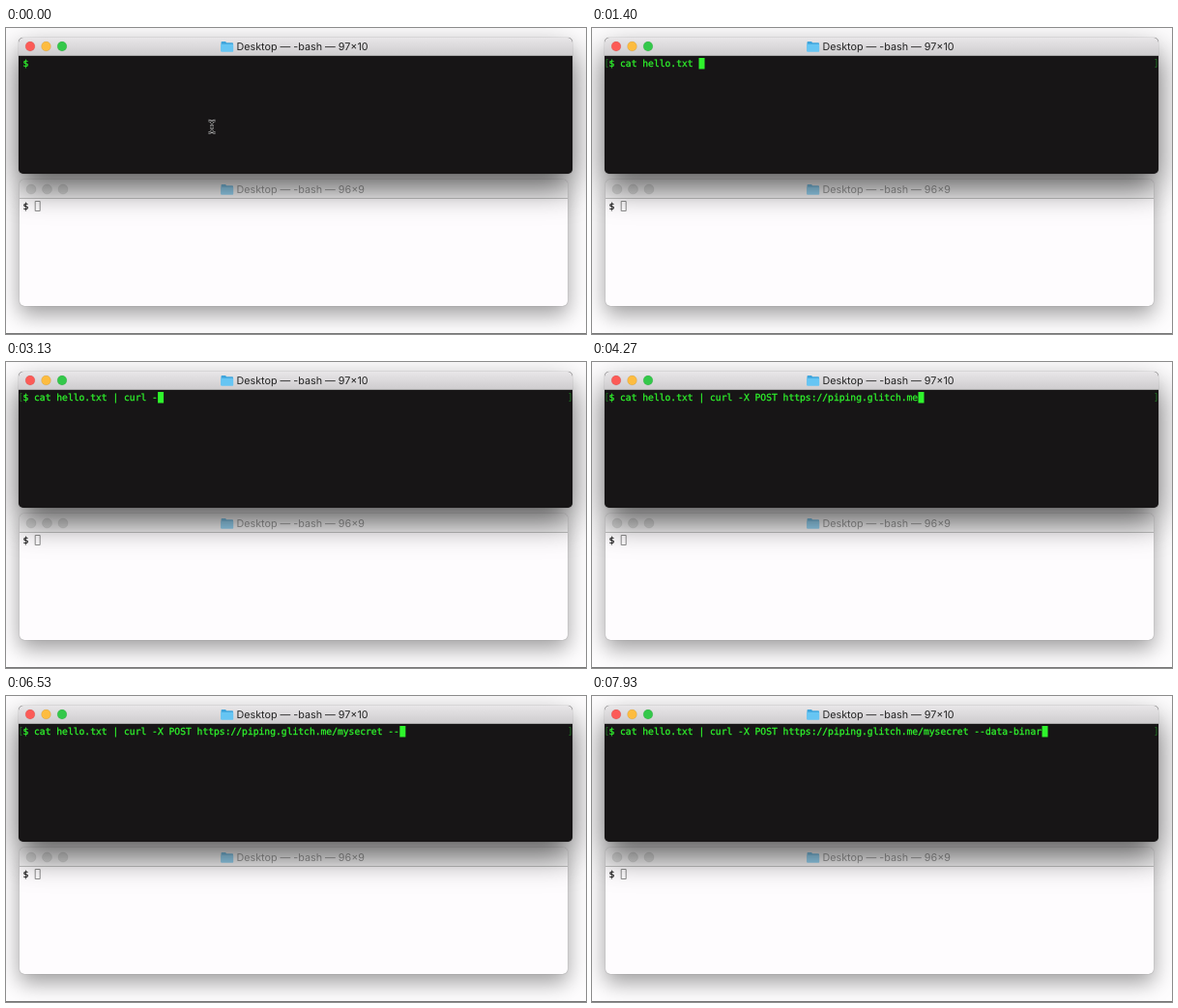
An HTML page for the animation above (8000 ms loop, 600 by 317 pixels).

```html
<!DOCTYPE html>
<html lang="en">
<head>
<meta charset="utf-8">
<title>Terminal typing</title>
<style>
html, body { margin: 0; width: 100%; height: 100%; overflow: hidden; background: #fefdfe; }
svg, .win { position: absolute; }
svg { left: 0; top: 0; }
text { white-space: pre; text-rendering: geometricPrecision; }
.title { font: 10.76px Inter, "Open Sans", sans-serif; }
.mono { font: 9.67px "DejaVu Sans Mono", monospace; }
.win { border-radius: 5px; }
#back { left: 14px; top: 157px; width: 567px; height: 131px; background: #fefcfe;
  box-shadow: 0 0 1px rgba(0,0,0,.45), 0 9px 22px rgba(0,0,0,.38); }
#front { left: 13px; top: 10px; width: 573px; height: 141px; background: #171516;
  box-shadow: 0 0 1px rgba(0,0,0,.6), 0 15px 32px rgba(0,0,0,.62); }
.bar { height: 19px; border-radius: 5px 5px 0 0; }
#back .bar { background: #f4f3f4; border-bottom: 1px solid #c0c0c0; }
#front .bar { height: 18px; background: linear-gradient(#e8e6e8, #cfcdcf); border-bottom: 1px solid #a9a9a9; }
</style>
</head>
<body>
<div class="win" id="back"><div class="bar"></div></div>
<svg width="600" height="317">
  <g id="backBar"></g>
  <text class="mono" x="17.6" y="187.6" fill="#000" stroke="#000" stroke-width=".15">$</text>
  <path d="M30.2 179.5h5v10h-5z" fill="none" stroke="#8c8c8c"/>
</svg>
<div class="win" id="front"><div class="bar"></div></div>
<svg width="600" height="317">
  <g id="frontBar"></g>
  <path id="marks" d="M16.500 32.500h-1.500v8h1.500M582.500 32.500h1.500v8h-1.500" fill="none" stroke="#1f7a22" stroke-width=".8"/>
  <text class="mono" id="line" x="17.4" y="40" fill="#2ff52c" stroke="#2ff52c" stroke-width=".28"></text>
  <rect id="block" y="31" width="6" height="11.5" fill="#2ff52c"/>
  <g id="mouse" fill="none">
    <path id="beam" d="M209.5 96q3.5 0 3.5 2.5q0-2.5 3.5-2.5M209.5 108.5q3.5 0 3.5-2.5q0 2.5 3.5 2.5M213 98v8.5M211 102.5h4" stroke="#b4b4b4" stroke-width="2.4"/>
    <use href="#beam" style="display:none"/>
    <path d="M209.5 96q3.5 0 3.5 2.5q0-2.5 3.5-2.5M209.5 108.5q3.5 0 3.5-2.5q0 2.5 3.5 2.5M213 98v8.5M211 102.5h4" stroke="#111"/>
  </g>
  <rect y="316" width="600" height="1" fill="#777"/>
</svg>
<script>
const $ = id => document.getElementById(id);
const LOOP = 8000, CELL = 5.82, LEFT = 17.4, START = 330;

// Typed pieces: first key ms, last key ms, keys
const BURSTS = [
  [START, 600, "cat h"], [800, 1400, "ello.txt "], [1930, 2130, "| "], [2270, 3330, "curl -X "],
  [3530, 4070, "POST "], [4670, 5400, "/myse"], [5600, 6130, "cret "],
  [6400, 6530, "--"], [6730, 7330, "data-"], [7470, 7930, "binar"]
];
const PASTE = [4270, "https://piping.glitch.me"];

function titleBar(id, x, y, lights, rim, ink, title, fade) {
  const dots = lights.map((c, i) =>
    `<circle cx="${x + i * 16.5}" cy="${y}" r="4.9" fill="${c}" stroke="${rim}" stroke-width=".5"/>`).join("");
  $(id).innerHTML = dots +
    `<g transform="translate(222 ${y - 5})" opacity="${fade}">
      <path d="M.5 1q0-1 1-1h3.5l1.2 1.3h5.800q1 0 1 1v7.700h-12.500z" fill="#3fa5dc"/>
      <rect x=".2" y="2.7" width="13" height="8" rx=".8" fill="#66c5f3"/>
    </g>
    <text class="title" x="238.5" y="${y + 4}" fill="${ink}">${title}</text>`;
}

titleBar("backBar", 26, 167, Array(3).fill("#dadada"), "#c8c8c8", "#989898", "Desktop — -bash — 96×9", .65);
titleBar("frontBar", 25, 19, ["#fc5b57", "#fdbc40", "#34c84a"], "rgba(0,0,0,.15)", "#222", "Desktop — -bash — 97×10", 1);

// Keys of each piece are spread evenly from its first key to its last
function typed(t) {
  let line = "$ ", pasted = false;
  for (const [first, last, keys] of BURSTS) {
    if (!pasted && t >= PASTE[0] && first > PASTE[0]) {
      line += PASTE[1];
      pasted = true;
    }
    if (t < first) break;
    const p = Math.min(1, (t - first) / (last - first));
    line += keys.slice(0, 1 + Math.floor(p * (keys.length - 1)));
  }
  return line;
}

function show(id, on) { $(id).style.visibility = on ? "visible" : "hidden"; }

function draw(now) {
  const t = now % LOOP, line = typed(t);
  $("line").textContent = line;
  $("block").setAttribute("x", LEFT + line.length * CELL);
  show("block", t >= START);
  show("mouse", t < START);
  show("marks", t >= 800);
}

let begin;
function tick(now) {
  begin ??= now;
  draw(now - begin);
  requestAnimationFrame(tick);
}
draw(0);
requestAnimationFrame(tick);
</script>
</body>
</html>
```
